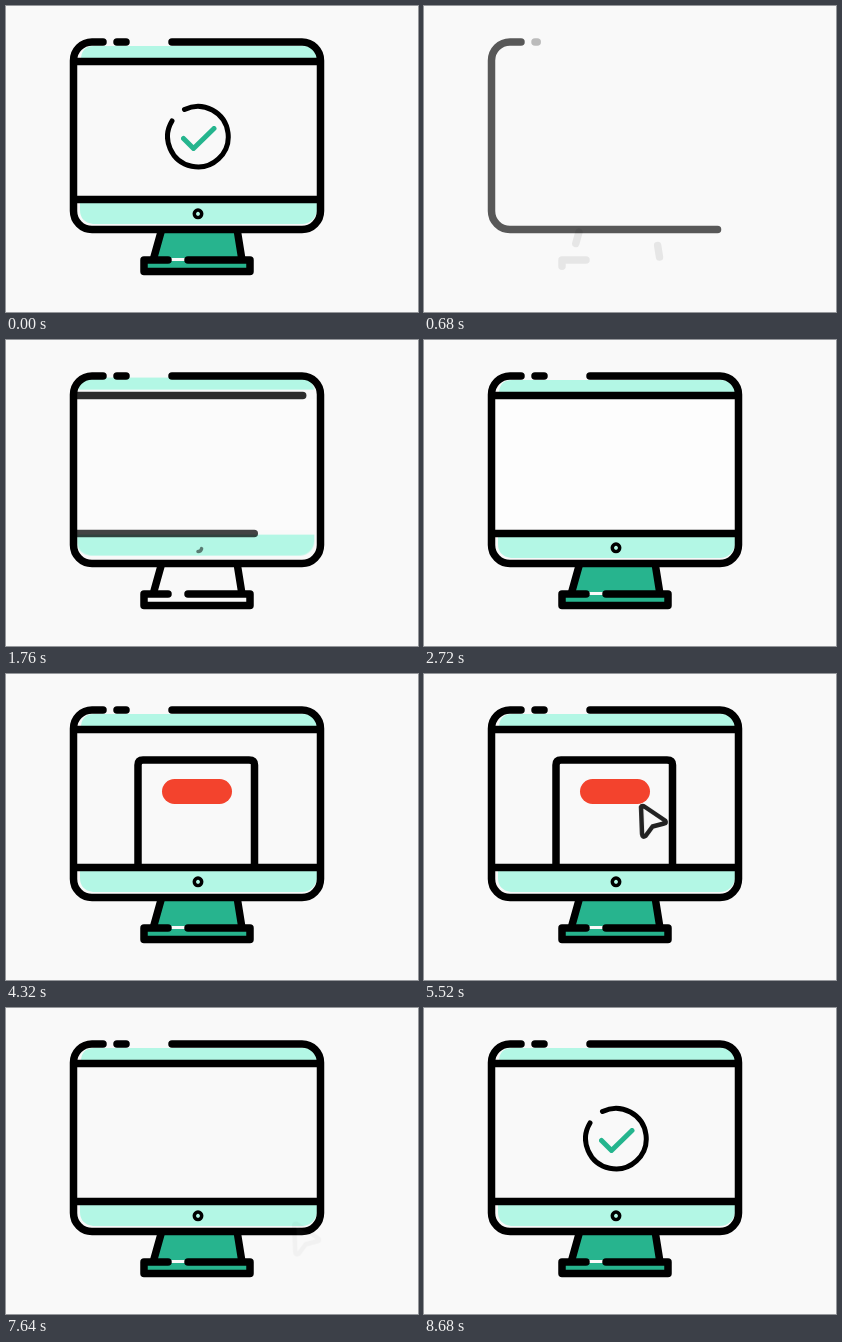
Animation of 412 by 306 pixels, one loop 9000 ms. Source, as an HTML page without scripts:

```html
<!DOCTYPE html>
<html lang="en">
<head>
<meta charset="utf-8">
<title>Computer click</title>
<style>
html, body { margin: 0; width: 100%; height: 100%; overflow: hidden; background: #f9f9f9; }
svg { display: block; width: 100%; height: 100%; }
svg * { animation: 9s linear infinite; }
.line { fill: none; stroke: #000; stroke-width: 7.5; stroke-linecap: round; stroke-linejoin: round; }
.draw { stroke-dasharray: 1.01 2; }
.mint { fill: #b3f7e5; }
.green { fill: #27b48e; }

.frame { animation-name: frame; }
.dash { animation-name: dash; }
.base { animation-name: base; }
.leg { animation-name: leg; }
.top { animation-name: top; }
.bottom { animation-name: bottom; }
.power { animation-name: power; }
.tint { animation-name: tint; }
.fill { animation-name: fill; }
.screen { animation-name: screen; }
.window { animation-name: window; }
.cursor { animation-name: cursor; }
.press { animation-name: press; transform-origin: 206px 119px; }
.tick { animation-name: tick; }
.ring { animation-name: ring; }
.check { animation-name: check; }

/* Monitor outline and stand */
@keyframes frame {
  0%, .44% { stroke-dashoffset: 0; opacity: 1; }
  .441%, 2.2% { stroke-dashoffset: 1.01; opacity: 0; }
  10.5% { stroke-dashoffset: .15; opacity: 1; }
  12%, 100% { stroke-dashoffset: 0; opacity: 1; }
}
@keyframes dash {
  0%, .44% { stroke-dashoffset: 0; opacity: 1; }
  .441%, 5.8% { stroke-dashoffset: 1.01; opacity: 0; }
  13%, 100% { stroke-dashoffset: 0; opacity: 1; }
}
@keyframes base {
  0%, .44% { stroke-dashoffset: 0; opacity: 1; }
  .441%, 6.4% { stroke-dashoffset: 1.01; opacity: 0; }
  7.56% { stroke-dashoffset: .87; opacity: .07; }
  16%, 100% { stroke-dashoffset: 0; opacity: 1; }
}
@keyframes leg {
  0%, .44% { stroke-dashoffset: 0; opacity: 1; }
  .441%, 6.4% { stroke-dashoffset: 1.01; opacity: 0; }
  7.56% { stroke-dashoffset: .55; opacity: .07; }
  14%, 100% { stroke-dashoffset: 0; opacity: 1; }
}

/* Bars, button and fills */
@keyframes top {
  0%, .44% { stroke-dashoffset: 0; opacity: 1; }
  .441%, 11.5% { stroke-dashoffset: 1.01; opacity: 0; }
  19.56% { stroke-dashoffset: .07; opacity: .82; }
  21%, 100% { stroke-dashoffset: 0; opacity: 1; }
}
@keyframes bottom {
  0%, .44% { stroke-dashoffset: 0; opacity: 1; }
  .441%, 12.4% { stroke-dashoffset: 1.01; opacity: 0; }
  22.2%, 100% { stroke-dashoffset: 0; opacity: 1; }
}
@keyframes power {
  0%, .44% { stroke-dashoffset: 0; opacity: 1; }
  .441%, 17.8% { stroke-dashoffset: 1.01; opacity: 0; }
  19.56% { stroke-dashoffset: .8; opacity: .5; }
  25%, 100% { stroke-dashoffset: 0; opacity: 1; }
}
@keyframes tint {
  0%, .44% { opacity: 1; transform: none; }
  .441%, 12.4% { opacity: 0; transform: translate(-10px, -9px); }
  19% { opacity: 1; }
  22.2%, 100% { opacity: 1; transform: none; }
}
@keyframes fill {
  0%, .44% { opacity: 1; transform: none; }
  .441%, 22.6% { opacity: 0; transform: translate(-4px, -4px); }
  30%, 100% { opacity: 1; transform: none; }
}
@keyframes screen {
  0%, 14% { opacity: 0; }
  22%, 43% { opacity: 1; }
  46%, 100% { opacity: 0; }
}

/* Page, pointer and click */
@keyframes window {
  0%, 32.8% { transform: translateY(112px); animation-timing-function: cubic-bezier(.3, 0, .3, 1); }
  42.3%, 76% { transform: none; animation-timing-function: cubic-bezier(.6, 0, .7, 1); }
  85.8%, 100% { transform: translateY(112px); }
}
@keyframes cursor {
  0%, 55.5% { opacity: 0; transform: translate(85px, 100px); animation-timing-function: cubic-bezier(.3, 0, .3, 1); }
  64.9%, 76% { opacity: 1; transform: none; animation-timing-function: cubic-bezier(.6, 0, .7, 1); }
  85.8%, 100% { opacity: 0; transform: translate(85px, 100px); }
}
@keyframes press {
  0%, 65.8% { transform: none; }
  69% { transform: scale(.85); }
  72%, 100% { transform: none; }
}
@keyframes tick {
  0%, 69% { stroke-dashoffset: 1.01; opacity: 0; }
  71% { opacity: 1; }
  74.5%, 76% { stroke-dashoffset: 0; opacity: 1; }
  79%, 100% { stroke-dashoffset: 0; opacity: 0; }
}

/* Success mark */
@keyframes ring {
  0%, .44% { stroke-dashoffset: 0; opacity: 1; }
  .441%, 86.2% { stroke-dashoffset: 1.01; opacity: 0; }
  95%, 100% { stroke-dashoffset: 0; opacity: 1; }
}
@keyframes check {
  0%, .44% { stroke-dashoffset: 0; opacity: 1; }
  .441%, 89% { stroke-dashoffset: 1.01; opacity: 0; }
  96.4%, 100% { stroke-dashoffset: 0; opacity: 1; }
}
</style>
</head>
<body>
<svg viewBox="0 0 412 306">
  <clipPath id="view"><rect x="71" y="59" width="241" height="133"/></clipPath>

  <rect class="screen" x="71" y="59" width="240" height="131" fill="#fdfdfd"/>
  <g class="mint tint">
    <path d="M75 52Q76 40 88 40H297Q309 40 311 52Z"/>
    <path d="M74 197H311V204A15 15 0 0 1 296 218H87Q74 216 74 204Z"/>
  </g>
  <g class="green fill">
    <path d="M155 226H231L236 252H148Z"/>
    <rect x="140" y="255" width="103" height="10"/>
  </g>

  <g clip-path="url(#view)">
    <g class="window">
      <path class="line" stroke-width="7" d="M132 200V91Q132 86 137 86H243Q248.500 86 248.500 91V200"/>
      <rect x="156" y="105" width="70" height="25" rx="12.500" fill="#f3432d"/>
    </g>
  </g>

  <g class="line">
    <path class="draw leg" pathLength="1" d="M155 226L148 251"/>
    <path class="draw leg" pathLength="1" d="M235.500 251L231.500 226"/>
    <path class="draw base" pathLength="1" d="M162 254H138V265.500H244V254H182"/>
    <path class="draw top" pathLength="1" d="M71 55.500H311"/>
    <path class="draw bottom" pathLength="1" d="M71 193.500H311"/>
    <path class="draw frame" pathLength="1" d="M97 36H86A18.500 18.500 0 0 0 67.500 54.500V205A18.500 18.500 0 0 0 86 223.500H296A18.500 18.500 0 0 0 314.500 205V54.500A18.500 18.500 0 0 0 296 36H166"/>
    <path class="draw dash" pathLength="1" d="M111 36H120"/>
  </g>
  <path class="line draw power" style="stroke-width:3.500" pathLength="1" d="M192 211.500A3.700 3.700 0 1 0 192 204.100A3.700 3.700 0 1 0 192 211.500"/>

  <g class="line" style="stroke-width:4.500">
    <path class="draw tick" pathLength="1" d="M222 116L226 102"/>
    <path class="draw tick" pathLength="1" d="M196 132.500L181 129.500"/>
  </g>
  <g class="cursor">
    <path class="line press" style="fill:#f9f9f9;stroke-width:4.500" d="M206 120Q207 118 210 120L230 133.500Q232 136 229 136.500L217.500 139.500L210.500 149Q207.500 151 207 147Z"/>
  </g>

  <path class="line draw ring" style="stroke-width:5" pathLength="1" d="M178.500 103.500A30.300 30.300 0 1 1 166 115"/>
  <path class="line draw check" style="stroke:#25b58e;stroke-width:5" pathLength="1" d="M177.500 132.500L187.500 142.500L208 122.500"/>
</svg>
</body>
</html>
```
